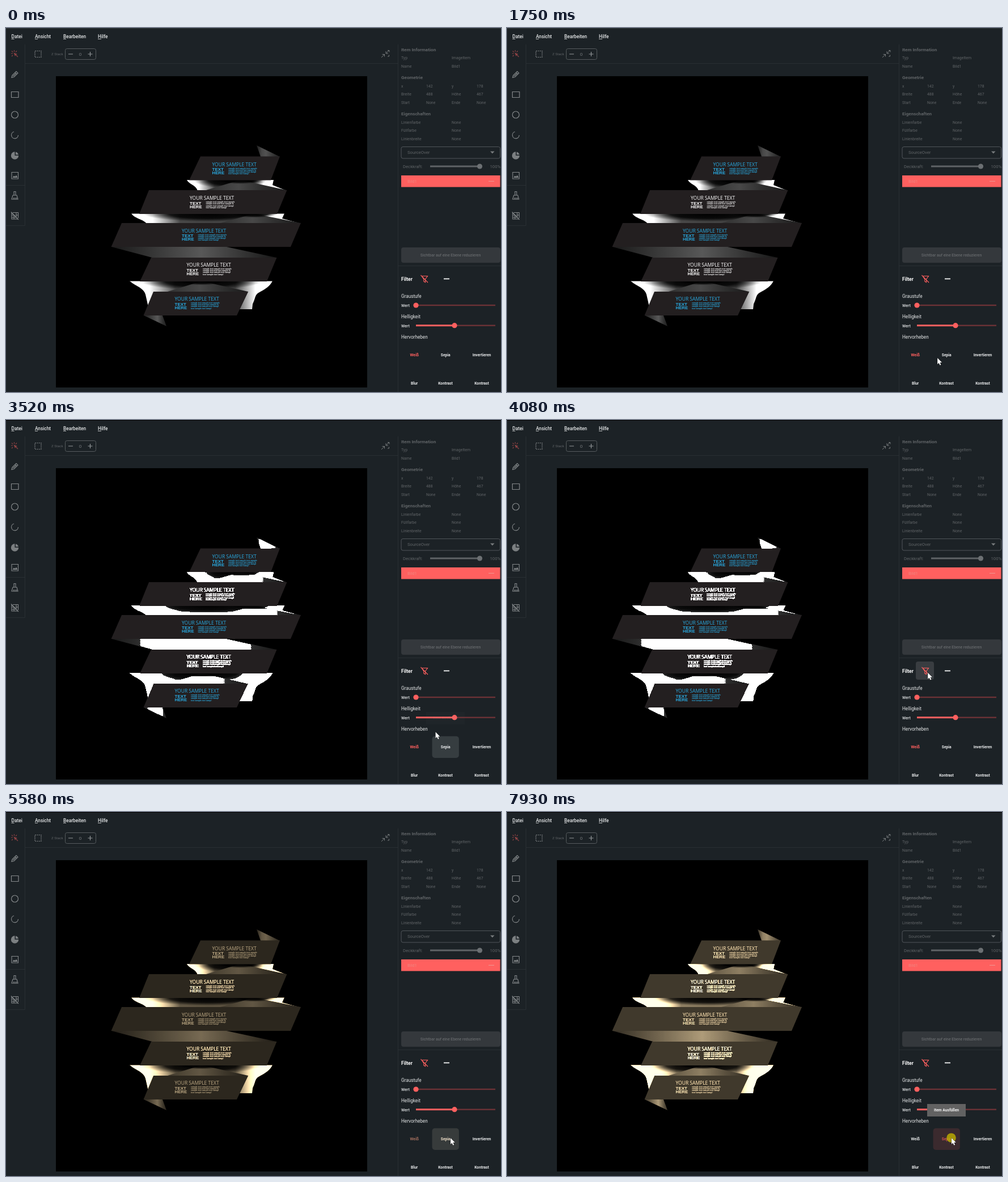
Animation, 873 px wide and 642 px high, one loop 8000 ms. Source, as an HTML page with a canvas:

```html
<!DOCTYPE html>
<html lang="de">
<head>
<meta charset="utf-8">
<title>Filter</title>
<style>
html, body { margin: 0; width: 100%; height: 100%; overflow: hidden; background: #1d2327; }
canvas { display: block; }
</style>
</head>
<body>
<canvas id="stage" width="873" height="642"></canvas>
<script>
const W = 873, H = 642, LOOP = 8000;
const RED = '#ff605f', DIM = '#606467', ICON = '#84888a', LINE = '#292f33', BG = '#1c2226';
const UI = 'Roboto, sans-serif';
const stage = document.getElementById('stage').getContext('2d');
let c = stage;

// ---------- helpers ----------
function text(str, x, y, size, color, weight = 400, align = 'left', family = UI) {
  c.font = `${weight} ${size}px ${family}`;
  c.textAlign = align;
  c.fillStyle = color;
  c.fillText(str, x, y + size * 0.36);
}
function rect(x, y, w, h, color) {
  c.fillStyle = color;
  c.fillRect(x, y, w, h);
}
function round(x, y, w, h, r, fill, stroke) {
  c.beginPath();
  c.roundRect(x, y, w, h, r);
  if (fill) { c.fillStyle = fill; c.fill(); }
  if (stroke) { c.strokeStyle = stroke; c.lineWidth = 1; c.stroke(); }
}
function disc(x, y, r, color) {
  c.beginPath();
  c.arc(x, y, r, 0, 7);
  c.fillStyle = color;
  c.fill();
}
function fillPath(d, color) {
  c.fillStyle = color;
  c.fill(new Path2D(d));
}
function strokePath(d, color, width = 1) {
  c.strokeStyle = color;
  c.lineWidth = width;
  c.stroke(new Path2D(d));
}
function across(x0, x1, stops) {
  const g = c.createLinearGradient(x0, 0, x1, 0);
  for (const [at, v] of stops) g.addColorStop(at, `rgb(${v},${v},${v})`);
  return g;
}
const clamp01 = v => Math.max(0, Math.min(1, v));
const ramp = (t, a, b) => clamp01((t - a) / (b - a));
const within = (t, spans) => spans.find(([a, b]) => t >= a && t < b);

// ---------- ribbon picture ----------
function shade(x0, x1, y, depth) {
  const rx = (x1 - x0) / 2;
  c.save();
  c.translate((x0 + x1) / 2, y);
  c.scale(rx, depth);
  const g = c.createRadialGradient(0, 0, 0, 0, 0, 1);
  g.addColorStop(0, 'rgba(0,0,0,1)');
  g.addColorStop(0.6, 'rgba(0,0,0,.85)');
  g.addColorStop(1, 'rgba(0,0,0,0)');
  c.fillStyle = g;
  c.fillRect(-1, 0, 2, 1);
  c.restore();
}
function fold(outline, xl, xr, y0, y1, tip) {
  const w = xr - xl, path = new Path2D(outline);
  c.save();
  c.clip(path);
  c.fillStyle = across(xl, xr, [[0, 255], [0.14, 255], [0.32, 72], [0.5, 66], [0.74, 70], [0.88, 255], [1, 255]]);
  c.fillRect(xl, y0, w + 60, 60);
  shade(xl + w * 0.08, xr - w * 0.08, y0, (y1 - y0) * 0.85);
  c.restore();
  const bend = tip - 82;
  fillPath(`M${bend} ${y0}L${tip} ${y1}H${bend - 60}Z`, across(bend - 60, tip, [[0, 48], [0.4, 72], [0.7, 46], [1, 26]]));
  shade(bend - 40, bend + 40, y0, 7);
}
function label(x, y, color) {
  text('YOUR SAMPLE TEXT', x, y, 8.5, color, 400, 'left', '"Open Sans", sans-serif');
  const wide = '"Liberation Sans", Arial, sans-serif';
  text('TEXT', x, y + 8.7, 8, color, 700, 'left', wide);
  text('HERE', x, y + 14.8, 7.8, color, 700, 'left', wide);
  const lines = ['sample text sample text sample', 'sample text and text sample te', 'sample text sample text sampl', 'text sample text sampl'];
  lines.forEach((s, i) => text(s, x + 28.5, y + 6.8 + i * 3.2, 3.4, color, 700, 'left', wide));
}
function drawRibbons() {
  rect(0, 0, W, H, '#000');
  fillPath('M442 207L483 227H449Z', across(442, 483, [[0, 28], [0.22, 72], [0.4, 82], [0.8, 46], [1, 30]]));
  fillPath('M243 507H276L283 526Z', across(243, 283, [[0, 34], [0.2, 48], [0.6, 88], [0.85, 46], [1, 32]]));
  fold('M319 268C323 276 334 276 338 287H495L470 277L472 268Z', 319, 472, 268, 286, 495);
  fold('M221 327C226 336 242 337 248 345H520L487 336L491 327Z', 221, 491, 327.5, 344, 520);
  fold('M218 446C226 454 243 458 246 470L251 492L262 465H427L412 496H434L435 487C441 475 438 471 447 466C457 461 466 455 470 446Z',
    218, 470, 446.5, 465, 427);
  fillPath('M186 386H389L477 405H258Z', across(186, 477, [[0, 25], [0.17, 45], [0.545, 88], [0.85, 45], [1, 23]]));
  const ribbons = [
    'M343 226.5H483L467 268.5H323Z', 'M252 286H495.5L478 328H235Z', 'M204 344H520L502 386H185.5Z',
    'M256 405H477.5L460 447H236Z', 'M260 465H427L407 507H242.5Z'
  ];
  for (const d of ribbons) fillPath(d, '#231f20');
  const blue = '#29abe2', white = '#fff';
  label(363.5, 240.5, blue);
  label(324, 300.2, white);
  label(310, 357.5, blue);
  label(318.5, 418, white);
  label(297.5, 478, blue);
}

// ---------- pixel filters ----------
const whiten = (r, g, b) => Math.min(r, g, b) > 45 ? [255, 255, 255] : [r, g, b];
const sepia = (r, g, b) => [
  0.393 * r + 0.769 * g + 0.189 * b,
  0.349 * r + 0.686 * g + 0.168 * b,
  0.272 * r + 0.534 * g + 0.131 * b
];
function newArt() {
  const cv = document.createElement('canvas');
  cv.width = W;
  cv.height = H;
  return cv;
}
function filtered(src, fn) {
  const cv = newArt(), g = cv.getContext('2d');
  const img = src.getContext('2d').getImageData(0, 0, W, H), px = img.data;
  for (let i = 0; i < px.length; i += 4) {
    const [r, gr, b] = fn(px[i], px[i + 1], px[i + 2]);
    px[i] = r; px[i + 1] = gr; px[i + 2] = b;
  }
  g.putImageData(img, 0, 0);
  return cv;
}
const plain = newArt();
c = plain.getContext('2d');
drawRibbons();
c = stage;
const white = filtered(plain, whiten);
const sepia1 = filtered(plain, sepia), sepia2 = filtered(sepia1, sepia), sepia3 = filtered(sepia2, sepia);
const looks = [[0, plain], [2890, white], [4280, plain], [5570, sepia1], [6620, sepia2], [7460, sepia3]];

// ---------- window ----------
function drawMenu() {
  for (const [s, x, u] of [['Datei', 9.5, 5], ['Ansicht', 51, 5], ['Bearbeiten', 101, 5], ['Hilfe', 162, 6]]) {
    text(s, x, 15, 8.3, '#e6e8e9', 500);
    rect(x, 19, u, 1, '#b4b7b8');
  }
}
function drawTools() {
  strokePath('M33.5 29V348.5H0M0 277.5H33M33 62.5H691M691.5 29V642M691 419.5H873', LINE);
  // magic pointer
  strokePath('M15 45L21 51M14.5 39V42M9 45H12M10 40.5L12.2 42.7M19 40.5L17 42.5M10 50L12 48', '#8c4244', 1.1);
  fillPath('M13.5 43.5L20 46L17.2 47.2L16 50Z', '#8c4244');
  // pen
  strokePath('M10 87.5L11 83.5L18 76.5L21 79.5L14 86.5ZM16 78.5L19 81.5M12.5 85L17 80.5', ICON, 1.2);
  strokePath('M9.5 112.5H22V122.5H9.5Z', ICON, 1.2);
  strokePath('M9.5 153a6 6 0 1 0 12 0a6 6 0 1 0 -12 0Z', ICON, 1.2);
  strokePath('M14 183A6 6 0 1 0 21.5 189', ICON, 1.2);
  fillPath('M15.5 225V218.3A6.7 6.7 0 1 0 22.2 225ZM17 218.5A6.5 6.5 0 0 1 22 223.5H17Z', '#7b7f81');
  strokePath('M10 254.5H21.5V266H10Z', ICON, 1.1);
  fillPath('M11.5 264L14 260.5L16 262.5L18 259.5L20.5 264Z', ICON);
  // brush
  strokePath('M14 288.5H17V295H14ZM12 295H19L21 302H10ZM13.5 302V299M16 302V299M18.5 302V299', ICON, 1.1);
  // grid off
  strokePath('M10 326V337H21M12 325.5H21.5V335M10 330H14M17 330H21M10 334H18M14 329V337M18 326V333M9 324.5L22 338', ICON, 1.1);
  // toolbar
  c.setLineDash([2, 1.4]);
  strokePath('M51 40.5H62V51.5H51Z', ICON, 1.2);
  c.setLineDash([]);
  text('Z Stack', 80, 46, 6.2, DIM);
  round(104.5, 36.5, 54, 19, 3, null, '#565b5e');
  strokePath('M110 46H118M144.5 46H152.5M148.5 42V50', '#94989a', 1.2);
  text('0', 131, 46, 8, '#777b7d', 400, 'center');
  strokePath('M662 52L667.5 46.5M663.5 46.5H667.5V50.5M676 39L670 45M670 41V45H674M673 39.5H676V42.5M673 50H675.5V47.5', '#74787a', 1);
}
function drawInfo() {
  for (const [s, y] of [['Item Information', 38.5], ['Geometrie', 87.5], ['Eigenschaften', 151.5]])
    text(s, 697, y, 8.1, DIM, 700);
  const cols = [697, 741, 786, 830];
  const rows = [
    [53, 'Typ', '', 'ImageItem'], [67.5, 'Name', '', 'Bild1'],
    [102.5, 'x', '142', 'y', '178'], [117, 'Breite', '488', 'Höhe', '467'], [131.5, 'Start', 'None', 'Ende', 'None'],
    [166.5, 'Linienfarbe', '', 'None'], [181, 'Füllfarbe', '', 'None'], [195.5, 'Linienbreite', '', 'None']
  ];
  for (const [y, ...cells] of rows) cells.forEach((s, i) => text(s, cols[i], y, 6.9, DIM));
  round(697, 209.5, 174.5, 20.5, 3, null, '#50555a');
  text('SourceOver', 708, 219.3, 7.7, DIM);
  fillPath('M854 217.5H861.5L857.75 221.5Z', '#777b7d');
  text('Deckkraft:', 700, 244, 7.7, DIM);
  rect(748, 242.5, 88, 3, '#5f6366');
  disc(835.5, 244, 4.6, '#6c7073');
  text('100%', 853.5, 244, 7.7, DIM);
  rect(697, 260, 174.5, 20.5, RED);
  text('Bild1', 708, 270.3, 7.5, '#ef8580');
  rect(851, 269.8, 10, 1, '#ee9a95');
  round(697, 387, 175, 27, 4, '#34383c');
  text('Sichtbar auf eine Ebene reduzieren', 784, 400.5, 6.85, '#66696c', 500, 'center');
}
function slider(y, at) {
  rect(723, y - 1.2, 140, 2.4, '#6c3236');
  rect(723, y - 1.5, at - 723, 3, RED);
  disc(at, y, 4.6, RED);
  text('Wert', 697, y + 0.3, 7, '#e4e6e7', 500);
}
function drawFilter(t) {
  if (t >= 3960 && t < 4420) round(721, 426, 32, 32, 4, '#393d41');
  text('Filter', 697, 442.5, 8.5, '#fff', 700);
  strokePath('M734 437.5H743.5L739.5 443V448.5L736.8 447V443L733.5 438.5M731.5 436L744 449', RED, 1.1);
  rect(772, 441.5, 10, 1.8, '#f2f3f3');
  text('Graustufe', 697, 473.5, 8.2, '#e4e6e7');
  slider(489, 723);
  text('Helligkeit', 697, 509.5, 8.2, '#e4e6e7');
  slider(524.7, 791);
  text('Hervorheben', 697, 545.3, 8.2, '#e4e6e7');
}

// ---------- interaction ----------
const presses = [[2620, 2900], [4150, 4280], [5300, 5510], [6410, 6620], [7340, 7460], [7920, LOOP]];
const whiteHover = [[1790, 3420]];
const sepiaHover = [[1480, 1720], [3440, 3570], [4850, LOOP]];
const trail = [
  [260, 828, 632], [480, 745, 545], [620, 690, 497], [690, 681, 486], [790, 702, 481],
  [1130, 702, 481], [1300, 728, 515], [1500, 780, 565], [1620, 789, 577], [1740, 762, 582], [1880, 726, 582],
  [3360, 726, 582], [3520, 757.5, 550.5], [3750, 774, 500], [4000, 748, 452], [4140, 738, 441],
  [4220, 738, 441], [4420, 748, 449], [4630, 767, 468], [4800, 786, 530], [4910, 790, 570], [4980, 785, 573], [5110, 784, 575]
];
function pointerAt(t) {
  const i = trail.findIndex(k => k[0] > t);
  if (i < 0) return trail[trail.length - 1].slice(1);
  const [t0, x0, y0] = trail[i - 1], [t1, x1, y1] = trail[i], f = (t - t0) / (t1 - t0);
  return [x0 + (x1 - x0) * f, y0 + (y1 - y0) * f];
}
function button(str, x, y, rgb, spans, width, t) {
  const hover = within(t, spans), press = within(t, presses), hot = rgb === '255,96,95';
  if (hover) {
    const a = 0.13 + (press && hot ? Math.min(0.12, (t - press[0]) * 0.0008) : 0);
    round(x - width / 2, 557.8, width, 38.2, 5, `rgba(${rgb},${a})`);
  }
  text(str, x, y, 6.7, `rgba(${rgb},${hover && hot ? 0.75 : 1})`, 700, 'center');
}
function drawButtons(t) {
  const hot = '255,96,95', pale = '232,234,235';
  const whiteTone = t < 5510 ? hot : t < 5720 ? '165,112,95' : pale;
  const sepiaTone = t < 5570 ? pale : t < 5720 ? '238,222,200' : hot;
  button('Weiß', 720.3, 577, whiteTone, whiteHover, 39.4, t);
  button('Sepia', 775.2, 577, sepiaTone, sepiaHover, 47.4, t);
  for (const [s, x, y] of [['Invertieren', 839, 577], ['Blur', 720, 627], ['Kontrast', 775, 627], ['Kontrast', 839, 627]])
    button(s, x, y, pale, [], 0, t);
}
function drawTip(t) {
  const alpha = t < 4000 ? ramp(t, 2690, 2830) * (1 - ramp(t, 3370, 3530)) : ramp(t, 5900, 6040);
  if (!alpha) return;
  const x = t < 3440 ? 720.2 : 775;
  c.globalAlpha = alpha;
  rect(x - 34, 515, 68, 22, '#626262');
  text('Item Ausfüllen', x, 525.2, 6.7, '#f4f4f4', 700, 'center');
  c.globalAlpha = 1;
}
function drawPointer(t) {
  if (t < 260) return;
  const [x, y] = pointerAt(t);
  if (within(t, presses)) disc(x - 0.5, y - 0.3, 8.3, 'rgba(190,175,0,.82)');
  c.save();
  c.translate(x, y);
  const arrow = 'M0 0V11L2.5 8.8L4.3 12.8L6.2 12L4.4 8.1H7.9Z';
  strokePath(arrow, 'rgba(0,0,0,.6)', 1);
  fillPath(arrow, '#fff');
  c.restore();
}

function draw(t) {
  rect(0, 0, W, H, BG);
  rect(0, 0, W, 1, t < 2620 ? '#30363a' : '#000');
  drawMenu();
  drawTools();
  drawInfo();
  const art = looks.filter(([at]) => at <= t).pop()[1];
  c.drawImage(art, 88, 84.5, 549, 549, 88, 84.5, 549, 549);
  drawFilter(t);
  drawButtons(t);
  drawTip(t);
  drawPointer(t);
}

const start = performance.now();
function tick() {
  draw((performance.now() - start) % LOOP);
  requestAnimationFrame(tick);
}
tick();
</script>
</body>
</html>
```
